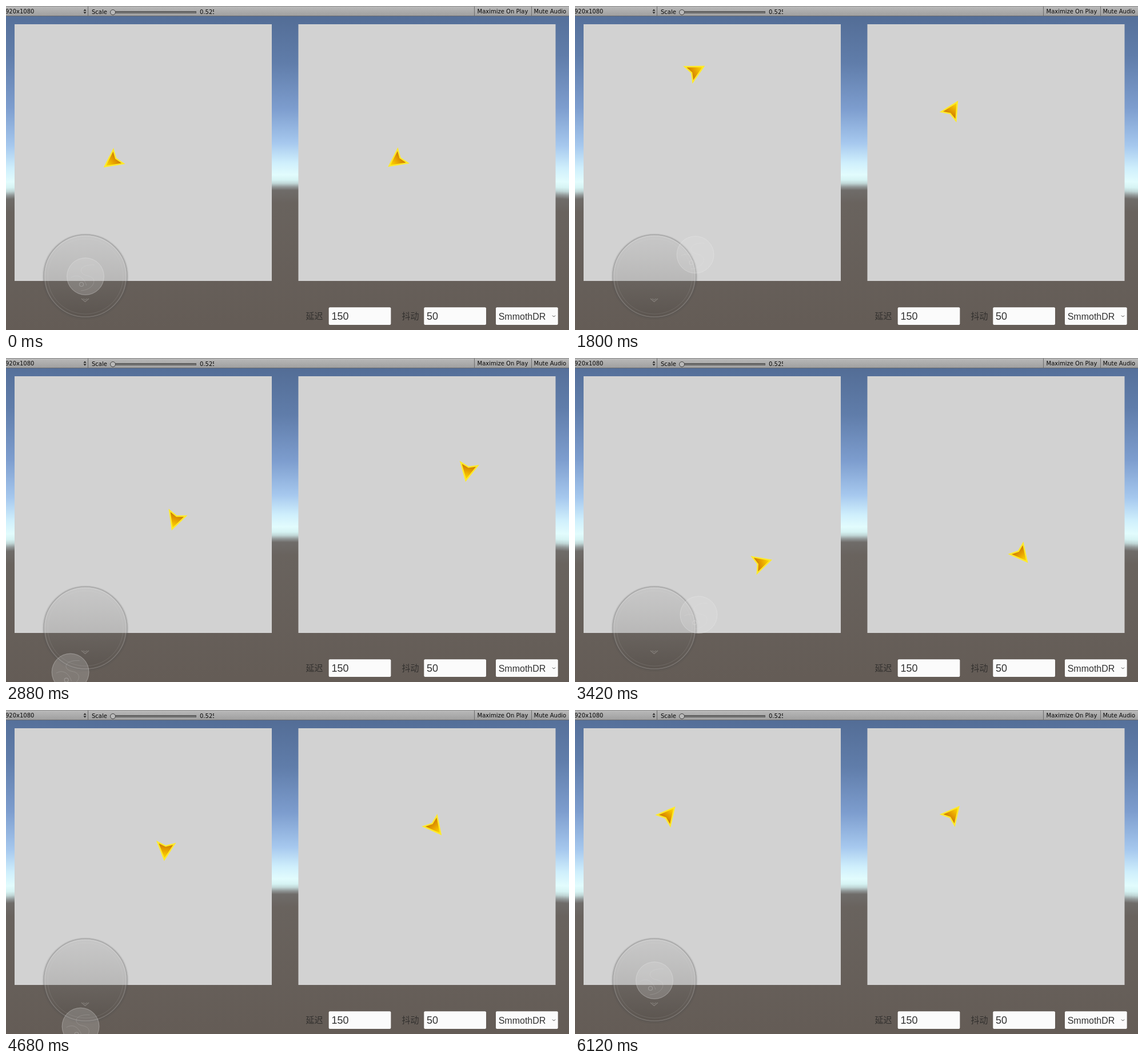
These frames come from a looping animation (985 by 568 pixels, 6540 ms). An HTML page with a canvas:

```html
<!DOCTYPE html>
<html lang="zh">
<head>
<meta charset="utf-8">
<title>Joystick sync demo</title>
<style>
html, body { margin: 0; width: 100%; height: 100%; overflow: hidden; background: #645d58; }
canvas { display: block; }
</style>
</head>
<body>
<canvas id="stage" width="985" height="568"></canvas>
<script>
const W = 985, H = 568, LOOP = 6540, STEP = 60;
const BASE = { x: 139, y: 474, r: 73 };
const REACH = 81, KNOB = 33;
const PRESS = 1020, RELEASE = 5760, IDLE = 144;
const SPEED = 0.27;                 // px per ms
const LAG = 280, SMOOTH = 80;       // delay and half-width of the remote average, ms
const SHIFT = { x: 497.5, y: -1 };  // from the left panel to the right one
const UI = '"DejaVu Sans", sans-serif';
const ARIAL = '"Liberation Sans", Arial, sans-serif';
const CJK = '"Noto Sans CJK SC", "Noto Sans CJK", sans-serif';

// Waypoints: time, x, y, heading in degrees
const route = [
  [1140, 188.5, 270, 248],
  [1520, 160, 186.5, 302],
  [1800, 208, 115, 332],
  [2600, 311, 196, 465],
  [2880, 297, 281.5, 469],
  [3300, 300, 366, 375],
  [3800, 321, 256, 241],
  [4080, 285.5, 189.5, 227],
  [4260, 246, 170, 160],
  [4400, 250, 207, 24],
  [4680, 279, 243, 96],
  [4880, 238, 269, 152],
  [5160, 171.7, 305, 185],
  [RELEASE, 161.5, 185.8, 309.5]
];

const canvas = document.getElementById('stage');
const ctx = canvas.getContext('2d');
const clamp = v => Math.max(0, Math.min(1, v));
const rad = deg => deg * Math.PI / 180;

// Steered flight: Hermite curve leaving each waypoint along its heading
function localPose(t) {
  let i = 0;
  while (i < route.length - 2 && route[i + 1][0] <= t) i++;
  const [t0, x0, y0, h0] = route[i], [t1, x1, y1, h1] = route[i + 1];
  const u = clamp((t - t0) / (t1 - t0)), v = 1 - u;
  const pull = SPEED * (t1 - t0);
  const mix = (a, b, wave) =>
    v * v * (1 + 2 * u) * a + u * u * (3 - 2 * u) * b +
    pull * u * v * (v * wave(rad(h0)) - u * wave(rad(h1)));
  return {
    x: mix(x0, x1, Math.cos),
    y: mix(y0, y1, Math.sin),
    deg: t < PRESS ? IDLE : h0 + (h1 - h0) * u
  };
}

// The remote copy is the late, averaged local flight
function remotePose(t) {
  const n = 8, sum = { x: 0, y: 0, deg: 0 };
  for (let i = 0; i <= n; i++) {
    const p = localPose(t - LAG + SMOOTH * (2 * i / n - 1));
    for (const k in sum) sum[k] += p[k] / (n + 1);
  }
  return { x: sum.x + SHIFT.x, y: sum.y + SHIFT.y, deg: sum.deg };
}

function ramp(c, y0, y1, stops) {
  const g = c.createLinearGradient(0, y0, 0, y1);
  stops.forEach(([p, color]) => g.addColorStop(p, color));
  return g;
}

function rect(c, x, y, w, h, fill) {
  c.fillStyle = fill;
  c.fillRect(x, y, w, h);
}

function text(c, str, x, y, size, family, fill) {
  c.font = size + 'px ' + family;
  c.fillStyle = fill;
  c.fillText(str, x, y);
}

function ring(c, x, y, r, width, stroke) {
  c.beginPath();
  c.arc(x, y, r, 0, Math.PI * 2);
  c.lineWidth = width;
  c.strokeStyle = stroke;
  c.stroke();
}

function disc(c, x, y, r, fill) {
  c.beginPath();
  c.arc(x, y, r, 0, Math.PI * 2);
  c.fillStyle = fill;
  c.fill();
}

function chevron(c, x, y, w, h, width, stroke) {
  c.beginPath();
  c.moveTo(x - w, y);
  c.lineTo(x, y + h);
  c.lineTo(x + w, y);
  c.lineWidth = width;
  c.strokeStyle = stroke;
  c.stroke();
}

// Sky whose horizon bends down towards both sides
function sky(c) {
  const stops = [
    [18, '#536d96'], [100, '#607daa'], [180, '#7d9dce'], [240, '#a6c8ee'],
    [275, '#cfeffc'], [296, '#e2fcfd'], [305, '#d6f3f3'], [311, '#c0d6d6'],
    [317, '#919797'], [323, '#6f6c69'], [345, '#69635e'], [560, '#645c56']
  ];
  for (let x = 0; x < W; x += 5) {
    const bend = 0.13 * ((x - 490) / 490) ** 2;
    const place = y => clamp((y + bend * (Math.min(y, 330) - 200)) / H);
    rect(c, x, 0, 5, H, ramp(c, 0, H, stops.map(([y, color]) => [place(y), color])));
  }
}

function toolbar(c) {
  rect(c, 0, 0, W, 17, ramp(c, 0, 17, [[0, '#bababa'], [1, '#a0a0a0']]));
  rect(c, 0, 0, W, 1, '#8c8c8c');
  rect(c, 0, 17, W, 1, '#66696f');
  [143, 819, 919].forEach(x => rect(c, x, 1, 1, 16, '#6c6c6c'));
  text(c, '920x1080', -1, 13, 10, UI, '#080808');
  text(c, 'Scale', 150, 14, 10, UI, '#080808');
  text(c, 'Maximize On Play', 824.5, 13, 10, UI, '#080808');
  text(c, 'Mute Audio', 923.5, 13, 10, UI, '#080808');
  c.save();
  c.beginPath();
  c.rect(335, 0, 29, 17);
  c.clip();
  text(c, '0.525', 339, 14, 10, UI, '#080808');
  c.restore();
  c.fillStyle = '#222';
  for (const d of [-1, 1]) {
    c.beginPath();
    c.moveTo(135.5, 9.5 + d);
    c.lineTo(140.5, 9.5 + d);
    c.lineTo(138, 9.5 + 4 * d);
    c.fill();
  }
  rect(c, 187, 9, 146, 4, '#5c5c5c');
  rect(c, 188, 11, 144, 1, '#848484');
  disc(c, 187, 11, 4.5, '#b9b9b9');
  ring(c, 187, 11, 4.5, 1, '#404040');
}

function field(c, x, label, size) {
  c.beginPath();
  c.roundRect(x, 528.3, 108.7, 30.7, 2);
  c.fillStyle = '#fbfbfb';
  c.fill();
  text(c, label, x + 4.7, 550.3, size, ARIAL, '#323232');
}

function pad(c) {
  const { x, y, r } = BASE;
  ring(c, x, y + 0.5, r + 1, 3, 'rgba(70,70,70,.10)');
  disc(c, x, y, r, ramp(c, y - r, y + r,
    [[0, 'rgba(150,150,150,.18)'], [0.5, 'rgba(118,116,114,.26)'], [1, 'rgba(70,66,62,.30)']]));
  ring(c, x, y, r, 1.6, 'rgba(85,85,85,.22)');
  ring(c, x, y, r - 2, 1.4, 'rgba(235,235,235,.20)');
  ring(c, x, y, r - 7, 0.8, 'rgba(220,220,220,.16)');
  chevron(c, x - 0.5, 513, 6.5, 5.5, 1.3, 'rgba(190,186,182,.38)');
  chevron(c, x - 0.5, 513, 3.5, 2, 1.2, 'rgba(190,186,182,.30)');
}

function backdrop() {
  const layer = document.createElement('canvas');
  layer.width = W;
  layer.height = H;
  const c = layer.getContext('2d');
  sky(c);
  toolbar(c);
  rect(c, 15, 32, 450, 450, '#d2d2d2');
  rect(c, 511.5, 32, 450, 450, '#d2d2d2');
  text(c, '延迟', 524.5, 549, 15, CJK, '#32302e');
  text(c, '抖动', 692.5, 549, 15, CJK, '#32302e');
  field(c, 564.7, '150', 18);
  field(c, 731.3, '50', 18);
  field(c, 857, 'SmmothDR', 16);
  chevron(c, 958.5, 542.5, 2.5, 2.5, 1, '#444');
  pad(c);
  return layer;
}

function knob(x, y) {
  disc(ctx, x, y, KNOB, 'rgba(225,225,225,.22)');
  ring(ctx, x, y, KNOB - 0.7, 1, 'rgba(240,240,240,.24)');
  ctx.save();
  ctx.translate(x, y);
  ctx.beginPath();
  ctx.moveTo(16, -20);
  ctx.bezierCurveTo(-12, -22, -14, -4, 4, -1);
  ctx.bezierCurveTo(24, 3, 14, 24, -8, 25);
  ctx.moveTo(-25, 2);
  ctx.bezierCurveTo(-12, -6, -2, 4, 2, 16);
  ctx.lineWidth = 1;
  ctx.strokeStyle = 'rgba(235,235,235,.16)';
  ctx.stroke();
  ring(ctx, -7, 14, 3.5, 1.1, 'rgba(235,235,235,.28)');
  ctx.restore();
}

const gold = ctx.createLinearGradient(-9, 0, 16, 0);
gold.addColorStop(0, '#cc7800');
gold.addColorStop(0.45, '#e6a000');
gold.addColorStop(1, '#ffd800');

function arrow({ x, y, deg }) {
  ctx.save();
  ctx.translate(x, y);
  ctx.rotate(rad(deg));
  ctx.beginPath();
  ctx.moveTo(19.3, 0);
  ctx.lineTo(-10, 15);
  ctx.lineTo(-4.5, 0);
  ctx.lineTo(-10, -15);
  ctx.closePath();
  ctx.fillStyle = gold;
  ctx.fill();
  ctx.lineWidth = 2.4;
  ctx.strokeStyle = '#fdea2c';
  ctx.stroke();
  ctx.restore();
}

const scene = backdrop();

function draw() {
  const t = Math.floor(performance.now() % LOOP / STEP) * STEP;
  const me = localPose(t);
  const push = REACH * clamp((t - PRESS + STEP) / 180) * clamp((RELEASE + STEP - t) / 120);
  ctx.drawImage(scene, 0, 0);
  arrow(me);
  arrow(remotePose(t));
  knob(BASE.x + push * Math.cos(rad(me.deg)), BASE.y + push * Math.sin(rad(me.deg)));
  requestAnimationFrame(draw);
}
draw();
</script>
</body>
</html>
```
